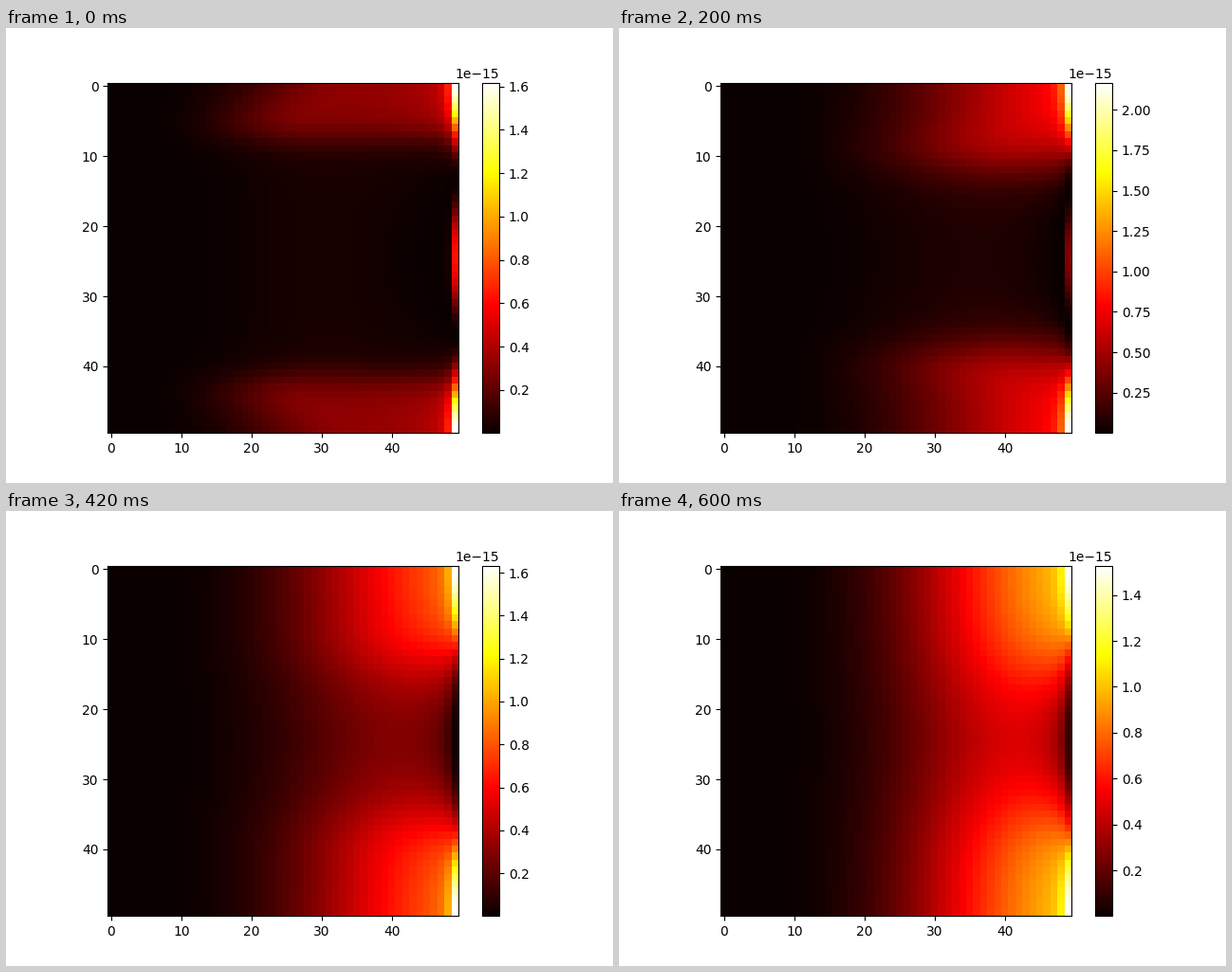
Recreate the animation shown at these times as a matplotlib script. Size 640 by 480 pixels, loop 0.62 s.

```python
import numpy as np
import matplotlib.pyplot as plt
from matplotlib.animation import FuncAnimation

N = 50
FRAMES = 31
UNIT = 1e-15

rows, cols = np.mgrid[0:N, 0:N].astype(float)
from_edge = np.minimum(rows, N - 1 - rows)
depth = N - 1 - cols
leftness = depth / (N - 1)
wave = 2 * np.pi * (rows + .5) / N


def logistic(z):
    return 1 / (1 + np.exp(-z))


def approach(start, end, t, tau):
    """Exponential ease from start to end."""
    return end + (start - end) * np.exp(-t / tau)


def peak(t):
    """Brightest value: a quick rise followed by a slow decay."""
    decay = 1.145 * np.exp(-t ** 2 / 192)
    rise = 1.045 * np.exp(-(t / 4.3) ** 1.5)
    return (1.518 + decay - rise) * UNIT


def edge_wave(ease):
    """Amplitude along the right edge, 1 in the corners."""
    centre = -.65 + .92 * ease
    ripple = .025 - .045 * ease
    return ((1 + centre) / 2 + (1 - centre) / 2 * np.cos(wave)
            - ripple * (1 - np.cos(2 * wave)))


def bulk(t, ease):
    """Two lobes that spread inwards and merge."""
    s = t / (FRAMES - 1)
    lobe = approach(8.1, 14.7, t, 10)
    soft = 1.4 + (1.8 + 3 * leftness) * s
    floor = .24 + .58 * ease ** 1.3
    floor = floor + .4 * (1 - floor) * leftness
    across = floor + (1 - floor) * logistic((lobe - from_edge) / soft)

    nose = 8 * (1 - ease) * np.exp(-((from_edge - lobe + 2.5) / 4.5) ** 2)
    reach = approach(36, 50, t, 5) - nose
    along = np.sin(np.pi / 2 * np.minimum(cols / reach, 1)) ** 2
    return (.445 + .335 * s) * along * across


def field(t):
    ease = logistic((t - 14.5) / 4)
    inner = bulk(t, ease)
    # Boundary layer joining the bulk to the right edge
    k = .8 - .3 * ease * (1 - np.cos(wave)) / 2
    layer = k * np.exp(-depth / .7) + (1 - k) * np.exp(-depth / 5)
    psi = inner + (edge_wave(ease) - inner[:, -1:]) * layer
    return peak(t) * psi ** 2


fig, ax = plt.subplots(figsize=(6.4, 4.8), dpi=100)
image = ax.imshow(field(0), cmap="hot", vmin=.001 * UNIT, vmax=peak(0))
fig.colorbar(image)


def update(t):
    image.set_data(field(t))
    image.set_clim(.001 * UNIT, peak(t))
    return [image]


anim = FuncAnimation(fig, update, frames=FRAMES, interval=20,
                     repeat=True, repeat_delay=0, blit=False)
plt.show()
```
